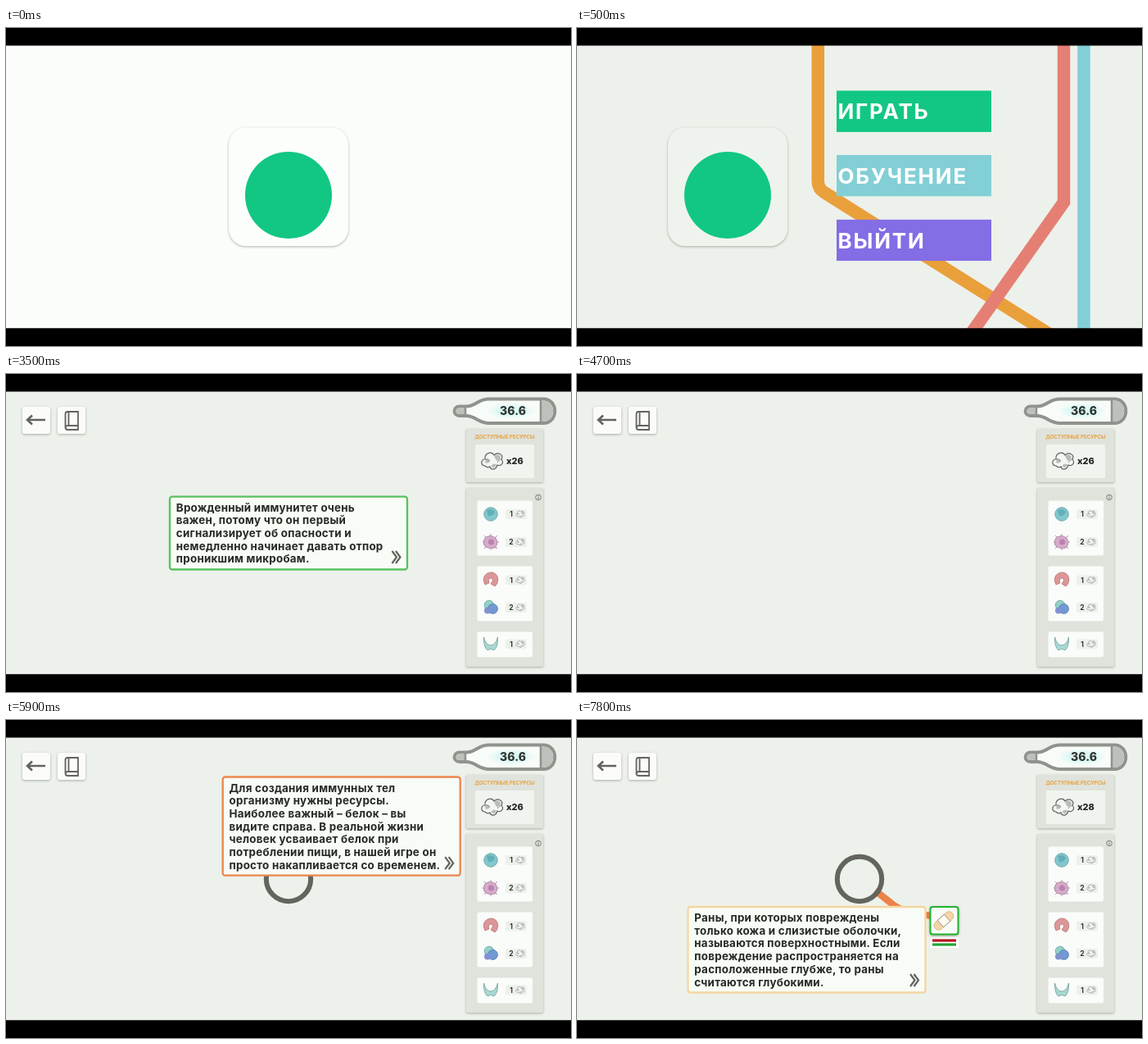
An HTML page that plays this animation: 690 by 388 pixels, repeating every 8000 ms.

```html
<!DOCTYPE html>
<html lang="ru">
<head>
<meta charset="utf-8">
<title>Иммунитет</title>
<style>
  html, body { margin: 0; width: 100%; height: 100%; overflow: hidden; background: #000; }
  svg { display: block; width: 100vw; height: 100vh; }
  text { font-family: Inter, "Open Sans", sans-serif; font-weight: 700; }
  .shadow { filter: drop-shadow(0 1.5px 1.5px rgba(60, 70, 55, .4)); }
  .speech { font-size: 13.4px; letter-spacing: .25px; fill: #262a24; }
  .item { font-size: 26px; letter-spacing: 1.8px; fill: #fff; }
  .line { fill: none; stroke-width: 15.5; stroke-dasharray: 1; }
  .grey { fill: none; stroke: #62645d; }
  .chip { font-size: 8.5px; fill: #30342e; }
</style>
</head>
<body>
<svg viewBox="0 0 690 388">
  <defs>
    <g id="protein" stroke="#62655f" stroke-width="1.2">
      <path fill="#f4f6f2" d="M-9 6C-15 6 -14 -2 -9 -2C-10 -10 -1 -12 2 -7C7 -12 14 -7 11 -2C15 3 10 7 6 5C4 12 -2 11 -3 7Q-6 9 -9 6Z"/>
      <path fill="#babdb7" stroke="none" d="M2 -6Q7 -10 10 -5Q10 -1 5 0ZM-1 5Q3 2 5 5Q3 10 -1 7ZM-8 -2Q-4 -3 -3 1Q-6 4 -9 2Z"/>
      <path fill="none" stroke-width=".7" d="M-9 -2Q-5 -3 -3 0M11 -2Q7 -1 6 2"/>
    </g>
    <radialGradient id="glow">
      <stop offset=".55" stop-color="#dcf8f5"/>
      <stop offset="1" stop-color="#f8fcf8"/>
    </radialGradient>
  </defs>

  <rect id="backdrop" width="690" height="388"/>

  <g id="menu">
    <path class="line" pathLength="1" stroke="#e9a03b" d="M294.3 10V187Q294.3 196 302 200.7L581 376"/>
    <path class="line" pathLength="1" stroke="#e57f74" d="M594.5 10V212.5L479 376"/>
    <path class="line" pathLength="1" stroke="#83cfd6" d="M619 10V376"/>
    <g id="items"></g>
    <g id="badge">
      <rect class="shadow" x="272" y="121.5" width="146" height="144.5" rx="21"/>
      <circle cx="345" cy="204" r="53" fill="#12c783"/>
    </g>
  </g>

  <g id="game">
    <g class="shadow" fill="#fbfcfa">
      <rect x="20" y="40" width="34" height="33" rx="3"/>
      <rect x="63" y="40" width="34" height="33" rx="3"/>
    </g>
    <path class="grey" stroke-width="2.6" d="M48 56H26M32 50.5L26 56L32 61.5"/>
    <path class="grey" stroke-width="1.8" d="M88 63V46H75Q72.5 46 72.5 49V65Q72.5 68 75.5 68H88V63H75.5Q72.5 63 72.5 66M76.5 46V63"/>

    <path fill="#f8fcf8" stroke="#90938d" stroke-width="4" d="M554 39.5H562C574 39.5 576 30.5 590 30.5H656C675 30.5 675 60 656 60H590C576 60 574 51 562 51H554C545.5 51 545.5 39.5 554 39.5Z"/>
    <path fill="#bec1bb" d="M653 32.5H656C672 32.5 672 58 656 58H653ZM554 41.5H560V49H554C548 49 548 41.5 554 41.5Z"/>
    <path stroke="#90938d" stroke-width="2.5" d="M653 31V59M561 40V50"/>
    <ellipse cx="617" cy="45" rx="30" ry="10" fill="url(#glow)"/>
    <text x="619" y="50" text-anchor="middle" font-size="14" style="font-weight:800" fill="#30342f">36.6</text>

    <g class="shadow" fill="#dfe3dc">
      <rect x="562" y="67" width="94" height="65" rx="1.5"/>
      <rect x="562" y="139" width="94" height="218" rx="1.5"/>
    </g>
    <text x="609" y="79.3" text-anchor="middle" font-size="6.1" fill="#e9a03b">ДОСТУПНЫЕ РЕСУРСЫ</text>
    <rect x="573" y="86" width="72" height="41" rx="1.5" fill="#f0f3ee"/>
    <use href="#protein" x="594" y="106"/>
    <text id="stock" x="611" y="110.3" font-size="11" style="font-weight:800" fill="#22251f"></text>
    <circle class="grey" cx="650" cy="150.5" r="3.3" stroke-width=".8"/>
    <path class="grey" stroke-width=".9" d="M650 149.8V152.6M650 148.3V149.1"/>

    <g fill="#fafcf9">
      <rect x="575.5" y="154.5" width="67.5" height="67" rx="2"/>
      <rect x="575.5" y="234.5" width="67.5" height="67" rx="2"/>
      <rect x="575.5" y="314.5" width="67.5" height="31" rx="2"/>
    </g>
    <g id="chips"></g>
    <g stroke-width=".8">
      <circle cx="592" cy="171" r="8.3" fill="#82c7cb" stroke="#649fa5"/>
      <path fill="#63afb8" d="M587 166Q593 163 597 168Q595 174 589 173Z"/>
      <path fill="none" stroke="#b58cab" stroke-width="1" d="M584 197L600 213M600 197L584 213M582 205H602M592 195V215"/>
      <path fill="#d5abc9" stroke="#a57d9d" d="M585 200Q591 195 598 200Q602 207 597 212Q588 214 584 209Q582 204 585 200Z"/>
      <circle cx="592.5" cy="205" r="3.6" fill="#ba82af"/>
      <path fill="#dc9697" stroke="#b87476" d="M585 257C580 247 587 242 593 242C602 243 603 254 597 259L592 256Q597 250 592 249Q588 250 590 255Z"/>
      <circle cx="590" cy="282" r="5.8" fill="#91d2c5" stroke="#6a9fa9"/>
      <circle cx="594.5" cy="286.5" r="6" fill="#7199d4" stroke="#597bb0"/>
      <circle cx="588" cy="288.5" r="4" fill="#8291d0"/>
      <path fill="#a7d8d1" stroke="#729f9b" d="M583.5 321Q586 331 592 331Q598 331 600.5 321Q601 333 596 337Q592 334 588 337Q583 333 583.5 321Z"/>
    </g>

    <g id="wound">
      <path fill="none" stroke="#ec8248" stroke-width="8.5" d="M364 208L383 223Q398 237 446 240"/>
      <rect class="shadow" x="431.5" y="228" width="34" height="33.5" rx="3" fill="#f8fbf6" stroke="#20b32d" stroke-width="2"/>
      <g transform="rotate(-42 448 245)" stroke="#d9ad79" stroke-width=".8">
        <rect x="434" y="239.5" width="28" height="11" rx="5.5" fill="#f5d5aa"/>
        <rect x="442.5" y="239.5" width="11" height="11" fill="#fffaf0" stroke="#8d806c"/>
      </g>
      <rect x="431.5" y="265.5" width="34.5" height="12.5" fill="#fff"/>
      <path stroke="#b61320" stroke-width="3.2" d="M434 269H463"/>
      <path stroke="#20a536" stroke-width="3.2" d="M434 274H463"/>
    </g>
    <circle id="node" class="grey" cx="345" cy="194" r="27.2" stroke-width="6"/>
    <g id="dialogs"></g>
  </g>

  <path d="M0 0H690V21.5H0ZM0 366.3H690V388H0Z"/>
</svg>
<script>
const LOOP = 8000, TICK = 100, LEADING = 15.7;
const $ = id => document.getElementById(id);

const menuItems = [
  ["ИГРАТЬ", 76.3, "#12c783"],
  ["ОБУЧЕНИЕ", 155, "#83cfd6"],
  ["ВЫЙТИ", 233.6, "#846de5"]
];
$("items").innerHTML = menuItems.map(([label, y, color]) =>
  `<svg x="317" y="${y}" width="189" height="50.6">
    <rect width="189" height="50.6" fill="${color}"/>
    <text class="item" x="1.5" y="35">${label}</text>
  </svg>`).join("");

const prices = [[171, 1], [205, 2], [251.5, 1], [285, 2], [329.5, 1]];
$("chips").innerHTML = prices.map(([y, price]) =>
  `<rect x="610" y="${y - 6}" width="26" height="12" rx="2" fill="#edf0eb"/>
   <text class="chip" x="617" y="${y + 3}" text-anchor="middle">${price}</text>
   <use href="#protein" transform="translate(628 ${y}) scale(.4)"/>`).join("");

const green = "#58c25d";
const dialogs = [
  { x: 200, y: 134, color: green, show: [1400, 1600], hide: [2700, 2900], lines: [
    "Врождённый иммунитет — это", "способность организма",
    "обезвреживать чужеродный и", "потенциально опасный",
    "биоматериал существующая", "изначально, до первого попадания",
    "этого биоматериала в организм."] },
  { x: 200, y: 149.7, color: green, show: [2800, 3000], hide: [4300, 4500], lines: [
    "Врожденный иммунитет очень", "важен, потому что он первый",
    "сигнализирует об опасности и", "немедленно начинает давать отпор",
    "проникшим микробам."] },
  { x: 92.2, y: 228, color: green, show: [4800, 5000], hide: [5300, 5500], lines: [
    "В лимфатических узлах находятся", "клетки памяти — это специальные",
    "клетки иммунной системы, которые", "хранят информацию о микробах,",
    "уже проникавших в организм", "ранее."] },
  { x: 264.7, y: 69.5, color: "#ec8650", show: [5600, 5900], hide: [6100, 6300], lines: [
    "Для создания иммунных тел", "организму нужны ресурсы.",
    "Наиболее важный – белок – вы", "видите справа. В реальной жизни",
    "человек усваивает белок при", "потреблении пищи, в нашей игре он",
    "просто накапливается со временем."] },
  { x: 135.5, y: 228, color: "#f5d6a0", show: [6800, 7200], hide: [8000, 8100], lines: [
    "Раны, при которых повреждены", "только кожа и слизистые оболочки,",
    "называются поверхностными. Если", "повреждение распространяется на",
    "расположенные глубже, то раны", "считаются глубокими."] }
];

function dialogMarkup({ x, y, color, lines }) {
  const height = lines.length * LEADING + 10.3;
  const rows = lines.map((line, i) =>
    `<text class="speech" x="7.8" y="${18 + i * LEADING}">${line}</text>`).join("");
  return `<g transform="translate(${x} ${y})">
    <rect width="290" height="${height}" rx="3" fill="#f8fcf6" stroke="${color}" stroke-width="2.3"/>
    ${rows}
    <path class="grey" stroke-width="2.2" transform="translate(271.5 ${height - 15})"
      d="M0 -7.5L5.5 0L0 7.5M4.5 -7.5L10 0L4.5 7.5"/>
  </g>`;
}
$("dialogs").innerHTML = dialogs.map(dialogMarkup).join("");

const dialogNodes = [...$("dialogs").children];
const buttons = [...$("items").children];
const lines = document.querySelectorAll(".line");

const ramp = (t, [from, to]) => Math.min(1, Math.max(0, (t - from) / (to - from)));
const easeOut = p => 1 - (1 - p) ** 2;
const mix = (a, b, p) => `rgb(${a.map((v, i) => v + (b[i] - v) * p)})`;
const fade = (node, opacity) => {
  node.style.opacity = opacity;
  node.style.display = opacity > 0 ? "" : "none";
};

function draw(t) {
  const opening = easeOut(ramp(t, [100, 500]));
  const gameShown = ramp(t, [1400, 1600]);

  $("backdrop").setAttribute("fill", mix([251, 253, 250], [237, 241, 235], opening));
  $("badge").setAttribute("transform", `translate(${-161 * opening})`);
  $("badge").firstElementChild.setAttribute("fill", mix([252, 254, 251], [239, 243, 238], opening));
  lines.forEach(line => {
    line.setAttribute("stroke-dashoffset", 1 - opening);
    line.style.display = opening > 0 ? "" : "none";
  });
  buttons.forEach(button => button.setAttribute("width", 189 * opening));

  fade($("menu"), 1 - gameShown);
  fade($("game"), gameShown);
  fade($("node"), ramp(t, [4800, 5000]));
  fade($("wound"), ramp(t, [6500, 6600]));
  $("stock").textContent = "x" + (26 + (t >= 6600) + (t >= 7000));
  dialogs.forEach(({ show, hide }, i) =>
    fade(dialogNodes[i], ramp(t, show) * (1 - ramp(t, hide))));
}

// The scene advances at ten steps per second.
const start = performance.now();
function frame() {
  const t = (performance.now() - start) % LOOP;
  draw(Math.floor(t / TICK) * TICK);
  requestAnimationFrame(frame);
}
frame();
</script>
</body>
</html>
```
